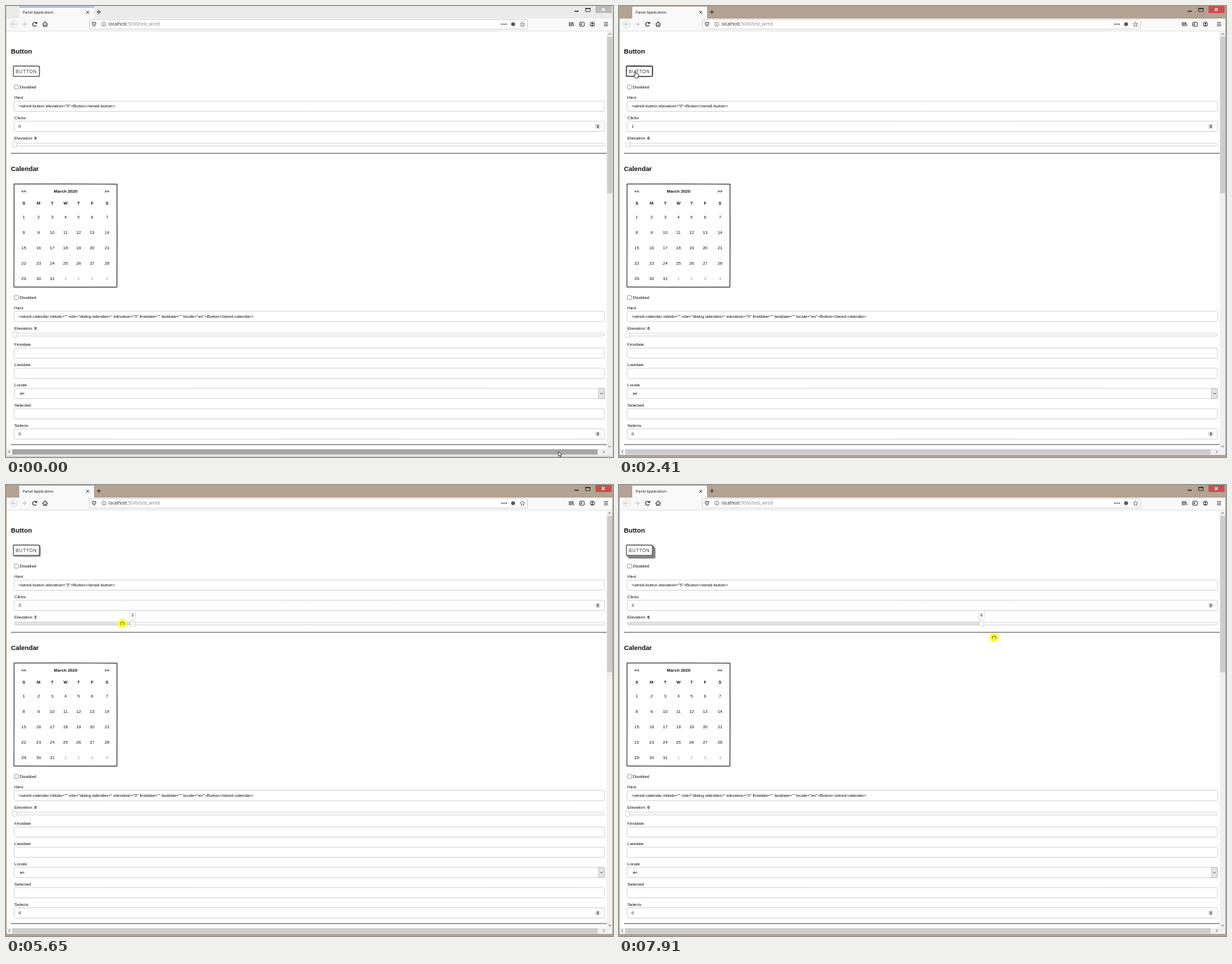
Recreate the animation shown at these times as an HTML page with a canvas. Size 869x645 px, loop 8000 ms.

```html
<!DOCTYPE html>
<html lang="en">
<head>
<meta charset="utf-8">
<title>Panel Application</title>
<style>
html, body { margin: 0; width: 100%; height: 100%; overflow: hidden; background: #fff; }
canvas { display: block; }
</style>
</head>
<body>
<canvas id="stage" width="869" height="645"></canvas>
<script>
const c = document.getElementById('stage').getContext('2d');
const LOOP = 8000;
const SANS = '"Liberation Sans", Arial, sans-serif';
const UI = '"Open Sans", "Noto Sans", sans-serif';

// Pointer steps: time, x, y, kind (arrow, hand, click, grab, drag)
const STEPS = [
  [0, 791, 637, 'arrow'], [200, 760, 590, 'arrow'], [400, 600, 440, 'arrow'],
  [600, 330, 260, 'arrow'], [800, 110, 150, 'arrow'], [980, 40, 106, 'arrow'],
  [1180, 25, 98, 'hand'], [1590, 25, 98, 'click'], [1790, 25, 98, 'hand'],
  [2610, 25, 98, 'click'], [2810, 25, 98, 'hand'], [3010, 24, 120, 'arrow'],
  [3210, 17, 165, 'arrow'], [3410, 15, 200, 'grab'], [3610, 15, 200, 'drag'],
  [4230, 24, 198, 'drag'], [4430, 42, 196, 'drag'], [4630, 62, 196, 'drag'],
  [4830, 84, 196, 'drag'], [5030, 105, 197, 'drag'], [5230, 124, 198, 'drag'],
  [5450, 146, 198, 'drag'], [5650, 166.5, 198, 'drag'], [5860, 190, 198, 'drag'],
  [6060, 217, 199, 'drag'], [6270, 246, 200, 'drag'], [6470, 273, 200, 'drag'],
  [6670, 311, 202, 'drag'], [6870, 347, 205, 'drag'], [7080, 380, 207, 'drag'],
  [7290, 411, 208, 'drag'], [7500, 444, 210, 'drag'], [7700, 475, 211, 'drag'],
  [7910, 537, 218, 'drag']
];
const SLIDER_X = 12.3, SLIDER_STEP = 84.45;

function valueAt(step) {
  return step[3] === 'drag' ? Math.round((step[1] - SLIDER_X) / SLIDER_STEP) : 0;
}

function fill(x, y, w, h, color) {
  c.fillStyle = color;
  c.fillRect(x, y, w, h);
}

function box(x, y, w, h, r, bg, border, lw = 1) {
  c.beginPath();
  c.roundRect(x, y, w, h, r);
  if (bg) { c.fillStyle = bg; c.fill(); }
  if (border) { c.strokeStyle = border; c.lineWidth = lw; c.stroke(); }
}

function line(points, color, lw = 1) {
  c.beginPath();
  for (let i = 0; i < points.length; i += 2) c.lineTo(points[i], points[i + 1]);
  c.strokeStyle = color;
  c.lineWidth = lw;
  c.stroke();
}

function circle(x, y, r, bg, border, lw = 1) {
  c.beginPath();
  c.arc(x, y, r, 0, 7);
  if (bg) { c.fillStyle = bg; c.fill(); }
  if (border) { c.strokeStyle = border; c.lineWidth = lw; c.stroke(); }
}

// y is the middle of the capitals
function text(s, x, y, { size = 6.1, bold = false, color = '#111', font = SANS, align = 'left', spacing = 0 } = {}) {
  c.font = `${bold ? 'bold ' : ''}${size}px ${font}`;
  c.textAlign = align;
  c.letterSpacing = spacing + 'px';
  c.fillStyle = color;
  c.fillText(s, x, y + size * 0.36);
  const width = c.measureText(s).width;
  c.letterSpacing = '0px';
  return width;
}

function bow(x1, y1, x2, y2, bx, by, color, lw) {
  c.beginPath();
  c.moveTo(x1, y1);
  c.quadraticCurveTo((x1 + x2) / 2 + bx, (y1 + y2) / 2 + by, x2, y2);
  c.strokeStyle = color;
  c.lineWidth = lw;
  c.stroke();
}

// Hand-drawn rectangle: every side is stroked twice with a slight bow
function sketch(x, y, w, h, bend, lw) {
  const r = x + w, b = y + h, col = '#3c3c3c';
  for (const k of [1, -0.4]) {
    const d = k * bend;
    bow(x, y - d * 0.3, r + d * 0.4, y + d * 0.3, 0, -d, col, lw);
    bow(r, y + d * 0.2, r - d * 0.2, b, d * 0.7, 0, col, lw);
    bow(r, b + d * 0.2, x, b - d * 0.2, 0, d * 0.5, col, lw);
    bow(x - d * 0.2, b, x + d * 0.3, y, d * 0.6, 0, col, lw);
  }
}

function cross(x, y, r, color, lw) {
  line([x - r, y - r, x + r, y + r], color, lw);
  line([x - r, y + r, x + r, y - r], color, lw);
}

function windowFrame(active) {
  fill(0, 0, 869, 645, active ? '#b4a292' : '#ebebeb');
  if (!active) {
    fill(0, 0, 1, 645, '#d2d2d2');
    fill(868, 0, 1, 645, '#d2d2d2');
    fill(0, 643.5, 869, 1.5, '#d2d2d2');
  }
  fill(1, 18, 867, 18, '#f9f9fa');
  fill(1, 36, 867, 606, '#fff');
  fill(19, 1, 107, 17, '#f9f9fa');
  if (!active) fill(19, 1, 107, 1, '#5c92c8');
  text('Panel Application', 24, 9.2, { size: 5.44, font: UI });
  cross(117, 9, 2, '#333', 0.9);
  line([130, 8.5, 136, 8.5], '#333');
  line([133, 5.5, 133, 11.5], '#333');
  line([814, 7.5, 820, 7.5], '#222', 1.4);
  box(829.8, 3.5, 6.5, 4.5, 0, null, '#222', 0.8);
  line([829.5, 3.6, 836.6, 3.6], '#222', 1.5);
  fill(844, 0, 23, 10, active ? '#c94f4f' : '#bcbcbc');
  cross(855, 5, 2, '#fff', 1.1);
}

function toolbar() {
  const ink = '#3b3b3f', pale = '#b8b8bb';
  circle(11, 26, 5, '#fdfdfd', '#cfcfcf', 0.8);
  for (const [x, s] of [[11, 1], [26, -1]]) {
    line([x - 3 * s, 26, x + 3 * s, 26], pale);
    line([x - 0.3 * s, 23.4, x - 3 * s, 26, x - 0.3 * s, 28.6], pale);
  }
  c.beginPath();
  c.arc(41, 26.2, 2.8, 0.5, 5.3);
  c.strokeStyle = ink;
  c.lineWidth = 1.1;
  c.stroke();
  fill(42, 23, 2.6, 2.6, ink);
  line([52.3, 26.3, 56, 22.8, 59.7, 26.3], ink, 1.1);
  line([53.5, 26, 53.5, 29.4, 55.3, 29.4, 55.3, 27, 56.7, 27, 56.7, 29.4, 58.5, 29.4, 58.5, 26], ink, 0.9);

  box(119.5, 19.5, 627, 13.5, 1, '#fff', '#cfcfcf', 0.9);
  c.beginPath();
  c.moveTo(123.3, 23.8);
  c.lineTo(126, 23);
  c.lineTo(128.7, 23.8);
  c.quadraticCurveTo(128.7, 28, 126, 29.4);
  c.quadraticCurveTo(123.3, 28, 123.3, 23.8);
  c.strokeStyle = ink;
  c.lineWidth = 0.9;
  c.stroke();
  line([126, 24.2, 126, 28], ink, 0.8);
  circle(140, 26, 3, null, '#77777a', 0.8);
  line([140, 25.4, 140, 28], '#77777a', 0.9);
  fill(139.6, 23.8, 0.8, 0.8, '#77777a');
  const style = { size: 6.2, font: UI, color: '#222' };
  const w = text('localhost', 147, 26.2, style);
  text(':5006/test_wired', 147 + w, 26.2, { ...style, color: '#88888a' });
  for (const x of [710, 713, 716]) circle(x, 26, 0.9, ink);
  circle(726, 26, 2.8, '#55555a');
  c.beginPath();
  for (let i = 0; i < 10; i++) {
    const a = i * Math.PI / 5 - Math.PI / 2, r = i % 2 ? 1.6 : 3.7;
    c.lineTo(739.5 + r * Math.cos(a), 26.3 + r * Math.sin(a));
  }
  c.closePath();
  c.lineWidth = 0.9;
  c.stroke();

  for (const x of [806.5, 808.4, 810.3]) line([x, 23, x, 29], ink);
  line([811.3, 23.3, 813.2, 29], ink);
  box(821.3, 23.2, 6.6, 5.8, 1, null, ink);
  fill(822.8, 24.7, 1.6, 2.8, ink);
  circle(839.5, 26, 3.2, null, ink, 0.9);
  circle(839.5, 25, 1.3, ink);
  fill(837.8, 27, 3.4, 1.3, ink);
  for (const y of [23.7, 26, 28.3]) line([856, y, 862, y], ink, 0.9);
  fill(1, 35.5, 867, 0.8, '#dcdcdd');
}

function scrollbars(hover) {
  fill(860, 36, 8, 606, '#f0f0f0');
  fill(1, 633, 867, 9, '#f0f0f0');
  fill(860.5, 44, 7.5, 224, '#cdcdcd');
  fill(9, 634, 838, 7.5, hover ? '#a6a6a6' : '#cdcdcd');
  const ink = '#555';
  line([862.3, 41, 864.2, 39.2, 866.1, 41], ink, 0.9);
  line([862.3, 629, 864.2, 630.8, 866.1, 629], ink, 0.9);
  line([5.5, 635.6, 3.7, 637.5, 5.5, 639.4], ink, 0.9);
  line([855, 635.6, 856.8, 637.5, 855, 639.4], ink, 0.9);
}

function field(y, value = '') {
  box(11.7, y - 7.3, 845.2, 14.6, 2, '#fff', '#d0d0d0', 0.9);
  text(value, 18, y);
}

function spinner(y) {
  box(844, y - 3, 6.5, 6, 1.5, '#e3e3e3', '#c4c4c4', 0.5);
  c.beginPath();
  for (const s of [-1, 1]) {
    c.moveTo(845.6, y + s * 0.5);
    c.lineTo(848.9, y + s * 0.5);
    c.lineTo(847.25, y + s * 2.5);
  }
  c.fillStyle = '#333';
  c.fill();
}

function checkbox(y) {
  box(12, y - 3, 5.8, 5.8, 1, '#fff', '#8a8a8a', 0.8);
  text('Disabled', 19.5, y);
}

function slider(y, value, tip) {
  const x = SLIDER_X + value * SLIDER_STEP;
  const w = text('Elevation: ', 12, y - 9);
  text(value, 12 + w, y - 9, { bold: true });
  box(12, y - 2, 845, 4, 2, '#fafafa', '#d0d0d0', 0.8);
  if (value) box(12, y - 2, x - 12, 4, 2, '#e4e4e4', '#d0d0d0', 0.8);
  box(x - 3, y - 3.8, 6, 7.8, 2, '#fff', '#c8c8c8', 0.8);
  if (tip) {
    box(x - 4.4, y - 19, 8.8, 13.2, 2, '#fff', '#d9d9d9', 0.8);
    text(value, x, y - 12.5, { align: 'center' });
  }
}

function rule(y) {
  fill(7, y - 0.5, 853, 1, '#555');
}

function buttonWidget(elevation, focused) {
  sketch(10.5, 86, 37.3, 14.6, 0.9, focused ? 1.15 : 0.7);
  for (let i = 1; i < elevation; i++) {
    const d = i * 0.91, r = 48 + d, b = 101 + d;
    const ink = `rgba(30,30,30,${0.85 - i * 0.07})`;
    bow(10.5 + d, b, r, b, 0, 0.5, ink, 0.9);
    bow(r, b, r, 86 + d, 0.4, 0, ink, 0.9);
  }
  text('BUTTON', 14, 93.2, { size: 6.4, spacing: 0.7, color: '#34343f' });
}

function calendar() {
  const cols = [25.5, 46.7, 66.2, 85.2, 104, 123.3, 144.6];
  const head = { bold: true, align: 'center', size: 6.2 };
  sketch(11.4, 254.7, 147.5, 147.3, 1.5, 0.75);
  text('<<', cols[0], 264.5, head);
  text('March 2020', 85.3, 264.5, head);
  text('>>', cols[6], 264.5, head);
  cols.forEach((x, i) => text('SMTWTFS'[i], x, 282, head));
  for (let i = 0; i < 35; i++) {
    const day = i < 31 ? i + 1 : i - 30;
    text(day, cols[i % 7], 302.3 + Math.floor(i / 7) * 21.9, { align: 'center', color: i < 31 ? '#111' : '#999' });
  }
}

function page(t, value, shown) {
  const heading = { size: 9.35, bold: true };
  const clicks = t >= 2810 ? 2 : t >= 1790 ? 1 : 0;
  text('Button', 7, 64.8, heading);
  buttonWidget(shown, t >= 1590 && t < 4230);
  checkbox(116);
  text('Html', 12, 131);
  field(143.3, `<wired-button elevation="${shown}">Button</wired-button>`);
  text('Clicks', 12, 160);
  field(172.2, clicks);
  spinner(172.2);
  slider(198.2, value, t >= 3610);
  rule(210.7);

  text('Calendar', 7, 233, heading);
  calendar();
  checkbox(417);
  text('Html', 12, 432);
  field(444, '<wired-calendar initials="" role="dialog tabindex=" elevation="0" firstdate="" lastdate="" locale="en">Button</wired-calendar>');
  slider(470, 0, false);
  ['Firstdate', 'Lastdate', 'Locale', 'Selected', 'Selects'].forEach((name, i) => {
    const y = 484.3 + i * 28.9;
    text(name, 12, y);
    field(y + 12.1, ['', '', ' en', '', '0'][i]);
  });
  box(848.3, 547, 8.4, 14.4, 0, '#e6e6e6', '#b5b5b5', 0.8);
  line([850.7, 553.3, 852.5, 555.1, 854.3, 553.3], '#333', 0.9);
  spinner(612);
  rule(627.2);
}

function shape(x, y, points) {
  c.beginPath();
  for (let i = 0; i < points.length; i += 2) c.lineTo(x + points[i], y + points[i + 1]);
  c.closePath();
  c.fillStyle = '#fff';
  c.strokeStyle = '#222';
  c.lineWidth = 0.8;
  c.fill();
  c.stroke();
}

function pointer([, x, y, kind]) {
  if (kind === 'click' || kind === 'drag') circle(x, y, 6.8, 'rgba(255,250,30,0.85)');
  if (kind === 'arrow') {
    shape(x, y, [0, 0, 0, 7, 1.6, 5.6, 2.6, 8, 3.7, 7.5, 2.7, 5.2, 4.8, 5]);
  } else if (kind === 'drag') {
    c.beginPath();
    c.roundRect(x - 2.6, y - 1.8, 5.2, 4.2, 1.3);
    c.fillStyle = '#fffa70';
    c.fill();
    line([x - 2, y + 2.4, x - 2.6, y + 0.3, x - 2, y - 1.7, x + 2, y - 1.7, x + 2.6, y, x + 2, y + 2.4], '#4a4a20', 0.8);
  } else {
    const top = kind === 'grab' ? -2.8 : -4.8;
    shape(x, y, [-2, top, -0.9, top, -0.8, -1.6, 2.6, -0.9, 3.2, 0, 2.6, 2.8, 2, 5, -1.6, 5, -3.8, 1.6, -3.5, 0.6, -2, 1.4]);
  }
}

function draw(now) {
  const t = now % LOOP;
  let i = STEPS.length - 1;
  while (STEPS[i][0] > t) i--;
  const step = STEPS[i];
  // The page follows the slider one step later
  const shown = valueAt(STEPS[Math.max(0, i - 1)]);
  windowFrame(t >= 1590);
  toolbar();
  page(t, valueAt(step), shown);
  scrollbars(t < 200);
  pointer(step);
  requestAnimationFrame(draw);
}

const start = performance.now();
draw(0);
function tick() {}
requestAnimationFrame = (raf => fn => raf(() => fn(performance.now() - start)))(requestAnimationFrame.bind(window));
</script>
</body>
</html>
```
